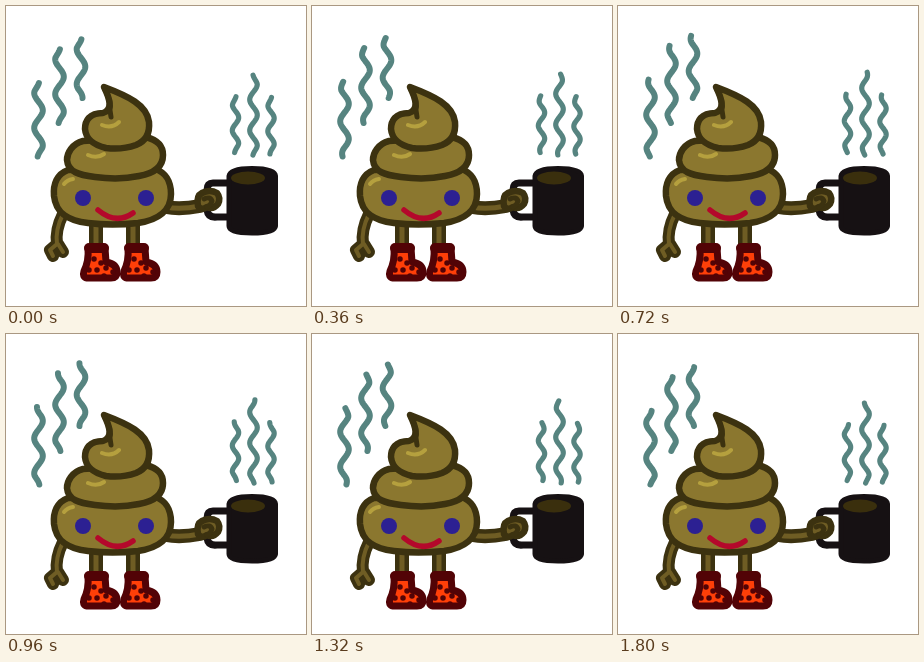
Write an HTML page that moves like this. It is 300x300 px and loops after 1920 ms.

```html
<!DOCTYPE html>
<html lang="en">
<head>
<meta charset="utf-8">
<title>Hot coffee</title>
<style>
  html, body { margin: 0; width: 100%; height: 100%; overflow: hidden; background: #fff; }
  svg { display: block; width: 100vw; height: 100vh; }
  path, ellipse { stroke-linecap: round; stroke-linejoin: round; }
  .body { fill: #8b772f; stroke: #3c3210; stroke-width: 6.5; }
  .limb { fill: none; stroke: #3c3210; stroke-width: 14; }
  .skin { fill: none; stroke: #6f5d24; stroke-width: 5; }
  .line { fill: none; stroke: #3c3210; stroke-width: 5; }
  .shine { fill: none; stroke: #b5a03e; stroke-width: 4; }
  .boot { fill: #ff3f08; stroke: #520306; stroke-width: 7; }
  .cuff { fill: none; stroke: #520306; stroke-width: 10; }
  .dots { fill: none; stroke: #520306; stroke-width: 5.5; }
  .mug { fill: #161113; stroke: #161113; stroke-width: 5; }
  .handle { fill: none; stroke: #161113; stroke-width: 7; }
  #steam { fill: none; stroke: #568480; }
</style>
</head>
<body>
<svg viewBox="0 0 300 300">
  <g id="steam"></g>

  <path class="limb" d="M90 218V243M127 218V243"/>
  <path class="skin" d="M90 218V243M127 218V243"/>
  <defs>
    <g id="boot">
      <path class="boot" d="M82 242H99L100 256Q111 258 111 266Q111 272 105 272H81Q76 271 78 265Q83 255 82 242Z"/>
      <path class="cuff" d="M83 242H98"/>
      <path class="dots" d="M88 253h0M95 257h0M83 264h0M91 264h0M100 262h0M107 266h0M98 270h0"/>
    </g>
  </defs>
  <use href="#boot"/>
  <use href="#boot" x="40"/>

  <path class="limb" style="stroke-width:12" d="M57 208Q49 224 51 238L44 244L47 250M52 238L57 246"/>
  <path class="skin" style="stroke-width:4" d="M57 208Q49 224 51 238L44 244L47 250M52 238L57 246"/>

  <path class="limb" d="M160 201Q174 204 194 200"/>
  <path class="skin" d="M160 201Q174 204 194 200"/>

  <path class="body" d="M62 164C51 168 47 178 48 190C50 208 63 215 82 217Q106 220 132 217C153 214 165 204 165 188C165 175 159 166 149 163Z"/>
  <path class="body" d="M77 135C66 138 61 147 61 154C62 166 73 169 89 171C104 173 119 173 133 170C150 167 157 160 157 149C157 139 151 134 140 131Z"/>
  <path class="body" d="M98 81C104 93 107 104 97 107C83 107 79 115 79 123C80 134 88 139 100 142Q116 144 130 139C140 135 144 127 143 116C141 99 122 90 98 81Z"/>
  <path class="line" d="M99 84Q106 96 104 104L105 111"/>
  <path class="shine" d="M96 119Q106 123 113 116M82 149Q91 153 98 148M58 178Q61 174 67 173"/>

  <circle cx="77" cy="192" r="8" fill="#2c2092"/>
  <circle cx="140" cy="192" r="8" fill="#2c2092"/>
  <path d="M92 204Q110 219 127 207" fill="none" stroke="#b4082b" stroke-width="5.5"/>

  <path class="handle" d="M224 177H207Q201 177 201 184V204Q202 212 211 211H224"/>
  <path class="body" style="fill:#6f5d24" d="M192 200Q190 190 196 187Q204 183 211 187Q215 192 212 198Q207 204 201 201Q195 205 192 200Z"/>
  <path class="line" d="M198 193Q204 190 206 195Q205 199 201 201"/>
  <path class="mug" d="M223 170Q224 162.5 246 162.5Q269 162.5 269.5 170V220Q269 227 246 227Q223 227 223 220Z"/>
  <ellipse cx="242" cy="172" rx="17" ry="6.5" fill="#3a2f0d"/>
</svg>
<script>
  const LOOP = 1920, STEP = 120, TAU = Math.PI * 2;

  // centre x, mean top, bottom, size, side of the first bend
  const wisps = [
    [32.5, 75, 150.5, 1, 1], [53.5, 41.3, 117, 1, 1], [75, 31.3, 92, 1, 1],
    [229.5, 89.3, 146.5, .74, 1], [247.5, 67.5, 149, .88, -1], [265, 90, 148, .74, 1]
  ].map(([x, top, bottom, size, side]) => {
    const path = document.createElementNS("http://www.w3.org/2000/svg", "path");
    path.setAttribute("stroke-width", size < 1 ? 5.2 : 6);
    document.getElementById("steam").append(path);
    return { path, x, top, bottom, size, side };
  });

  // A wave that climbs the wisp and swings less at its ends.
  function drawWisp({ path, x, top, bottom, size, side }, phase) {
    const start = top + 2 * size * Math.cos(phase);
    const points = [];
    for (let i = 0; i <= 60; i++) {
      const y = start + (bottom - start) * i / 60;
      const angle = TAU * (y - top - 2) / (35 * size) + phase + 1.37;
      const swing = 4.3 * size * side * Math.min(1, .45 + Math.min(y - start, bottom - y) / 16);
      points.push((x + swing * Math.cos(angle)).toFixed(2) + " " + y.toFixed(2));
    }
    path.setAttribute("d", "M" + points.join("L"));
  }

  function render() {
    const time = performance.now() % LOOP;
    const phase = TAU * Math.floor(time / STEP) * STEP / LOOP;
    wisps.forEach(wisp => drawWisp(wisp, phase));
    requestAnimationFrame(render);
  }
  render();
</script>
</body>
</html>
```
